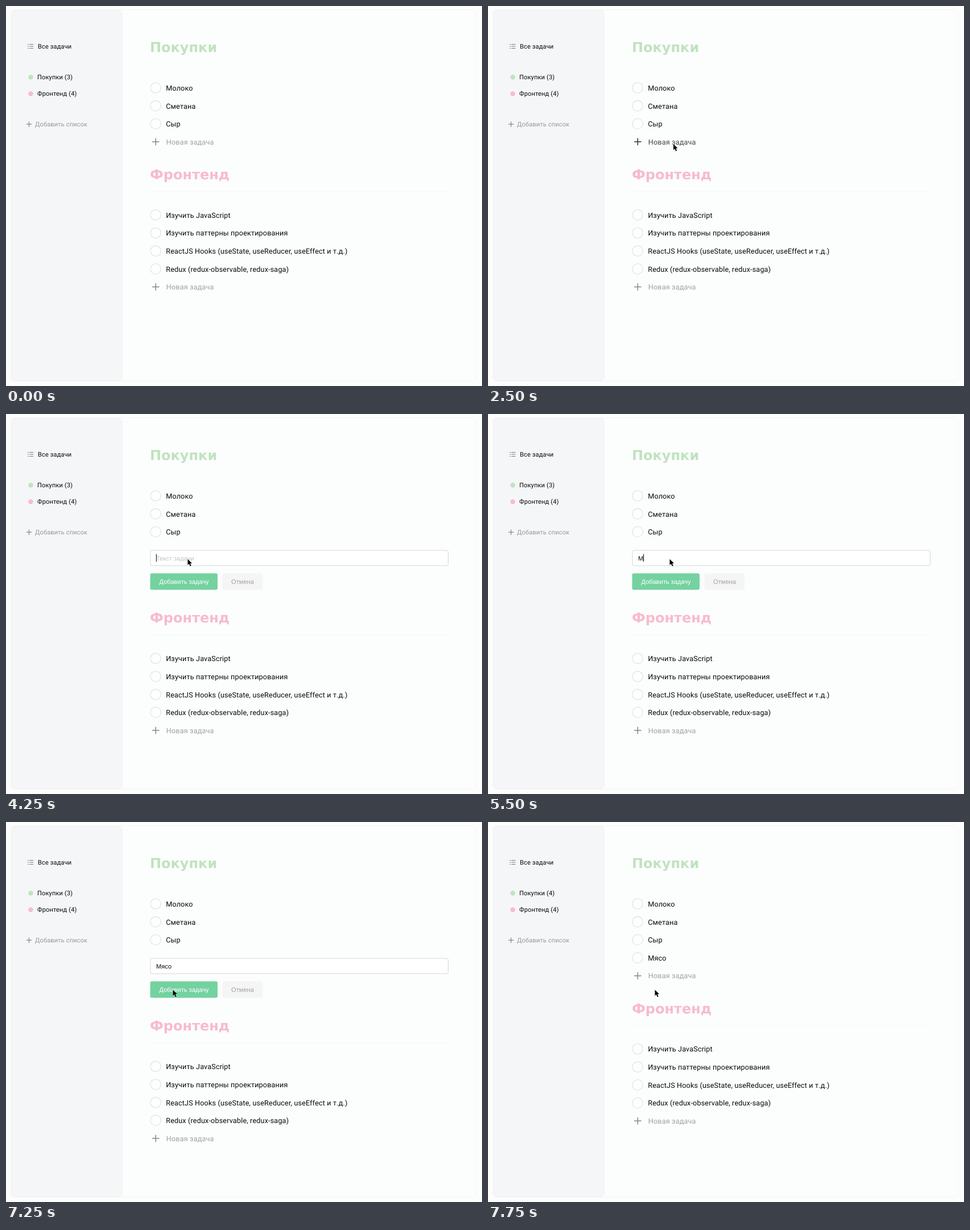
These frames come from a looping animation (837x669 px, 8 s). An HTML page:

```html
<!DOCTYPE html>
<html lang="ru">
<head>
<meta charset="utf-8">
<style>
  html, body { margin: 0; width: 100%; height: 100%; overflow: hidden; background: #fdfdfd; }
  svg { display: block; width: 837px; height: 669px; }
  text { font: 12.7px Roboto, sans-serif; letter-spacing: .12px; text-rendering: geometricPrecision; }
  .side { font-size: 11.1px; }
  .title { font: 700 24px "DejaVu Sans", sans-serif; letter-spacing: 0; }
  .form { font: 11.1px "Liberation Sans", Arial, sans-serif; letter-spacing: 0; }
</style>
</head>
<body>
<svg viewBox="0 0 837 669">
  <rect x="9" y="6.5" width="818" height="654" rx="8" fill="#fcfefd" stroke="#f3f5f4"/>
  <rect x="9" y="6.5" width="195.5" height="654" rx="8" fill="#f5f6f7" stroke="#f1f2f2"/>
  <g id="scene"></g>
</svg>
<script>
const LOOP = 8000, LEFT = 254, PITCH = 31.7;
const GREEN = '#c0e3bf', PINK = '#f8bbcc';
const scene = document.getElementById('scene');

// Cursor stops: start time, x, y (no position means hidden)
const cursorStops = [
  [0], [500, 632, 67], [750, 583, 92], [1000, 383, 231], [1250, 329, 280],
  [1500, 326, 250], [2250], [2500, 326, 243], [3250, 319.5, 255.5],
  [7000, 305, 272.5], [7250, 293.5, 295.5]
];
const typingStops = [[0, ''], [5500, 'М'], [5750, 'Мя'], [6250, 'Мяс'], [6500, 'Мясо']];
const current = (stops, t) => stops.findLast(stop => stop[0] <= t);

const text = (x, y, value, fill = '#0a0a0a', cls = '') =>
  `<text x="${x}" y="${y}" fill="${fill}" class="${cls}">${value}</text>`;
const rect = (x, y, w, h, fill, stroke = 'none') =>
  `<rect x="${x}" y="${y}" width="${w}" height="${h}" rx="3" fill="${fill}" stroke="${stroke}"/>`;
const dot = (x, y, r, fill, stroke = 'none') =>
  `<circle cx="${x}" cy="${y}" r="${r}" fill="${fill}" stroke="${stroke}" stroke-width="1.3"/>`;
const path = (d, stroke, width) =>
  `<path d="${d}" fill="none" stroke="${stroke}" stroke-width="${width}"/>`;
const plus = (x, y, r, color, width) =>
  path(`M${x - r} ${y}h${2 * r}M${x} ${y - r}v${2 * r}`, color, width);

function sidebar(count) {
  const lines = [67.5, 71, 74.5].map(y => `M38 ${y}h1.8M41.2 ${y}h7`).join('');
  return path(lines, '#777', 1.1) +
    text(56, 75, 'Все задачи', '#0a0a0a', 'side') +
    dot(43.5, 125.2, 4.2, GREEN) + text(55, 129, `Покупки (${count})`, '#0a0a0a', 'side') +
    dot(43.5, 154.5, 4.2, PINK) + text(55, 158.3, 'Фронтенд (4)', '#0a0a0a', 'side') +
    plus(40.5, 208.2, 4.7, '#868686', 1.2) + text(51, 212.3, 'Добавить список', '#999', 'side');
}

function taskList(y, name, color, tasks) {
  return text(LEFT - 1, y + 9.3, name, color, 'title') +
    path(`M${LEFT} ${y + 31}H778`, '#f7f9f8', 1) +
    tasks.map((task, i) => {
      const rowY = y + 72.5 + i * PITCH;
      return dot(263.2, rowY - .2, 9.2, '#fdfefe', '#e3e4e4') + text(281.2, rowY + 4.6, task);
    }).join('');
}

const newTask = (y, hovered) =>
  plus(263.3, y, 6.3, hovered ? '#333' : '#858585', 1.5) +
  text(281.8, y + 4.6, 'Новая задача', hovered ? '#444' : '#a0a0a0');

function form(typed, focused, caretOn, busy) {
  const width = busy ? 132.5 : 118.5, cancelX = LEFT + width + 8;
  const caretX = 264.4 + [0, 9.2, 15.2, 20.8, 27][typed.length];
  return rect(LEFT, 240, 523.5, 27, '#fff', focused ? '#d6d6d6' : '#efefef') +
    text(264, 257.7, typed || 'Текст задачи', typed ? '#0a0a0a' : '#c3c3c3', 'form') +
    (caretOn ? path(`M${caretX} 246.5v13.5`, '#000', 1) : '') +
    rect(253.5, 280.5, width, 29, busy ? '#e6e6e6' : '#74d2a0') +
    text(269.5, 299, busy ? 'Добавление задачи' : 'Добавить задачу', busy ? '#bdbdbd' : '#fff', 'form') +
    rect(cancelX, 280.5, 71, 29, '#f5f5f5') +
    text(cancelX + 15.6, 299, 'Отмена', '#a0a0a0', 'form');
}

const arrow = (x, y) => x === undefined ? '' :
  `<path transform="translate(${x} ${y})" d="M0 0V10.4L2.4 8.2L4.3 12.6L6.2 11.8L4.3 7.5H7.6Z"
    fill="#000" stroke="#fff" stroke-width=".8" paint-order="stroke"/>`;

function draw(t) {
  const open = t >= 2750 && t < 7750, added = t >= 7750;
  const focused = t >= 3250 && t < 7500;
  const caretOn = focused && t < 7000 && (t >= 5250 || (t - 3250) % 1000 < 500);
  const shopping = ['Молоко', 'Сметана', 'Сыр'].concat(added ? 'Мясо' : []);
  const frontY = 295.5 + (open ? 62.5 : added ? PITCH : 0);
  const [, cursorX, cursorY] = current(cursorStops, t);

  return sidebar(shopping.length) +
    taskList(71.7, 'Покупки', GREEN, shopping) +
    (open ? form(current(typingStops, t)[1], focused, caretOn, t >= 7500)
          : newTask(239 + (added ? PITCH : 0), t >= 2250 && t < 2750)) +
    taskList(frontY, 'Фронтенд', PINK, [
      'Изучить JavaScript',
      'Изучить паттерны проектирования',
      'ReactJS Hooks (useState, useReducer, useEffect и т.д.)',
      'Redux (redux-observable, redux-saga)'
    ]) +
    newTask(frontY + 199, false) +
    arrow(cursorX, cursorY);
}

let shown = '';
function tick() {
  const markup = draw(performance.now() % LOOP);
  if (markup !== shown) scene.innerHTML = shown = markup;
  requestAnimationFrame(tick);
}
tick();
</script>
</body>
</html>
```
